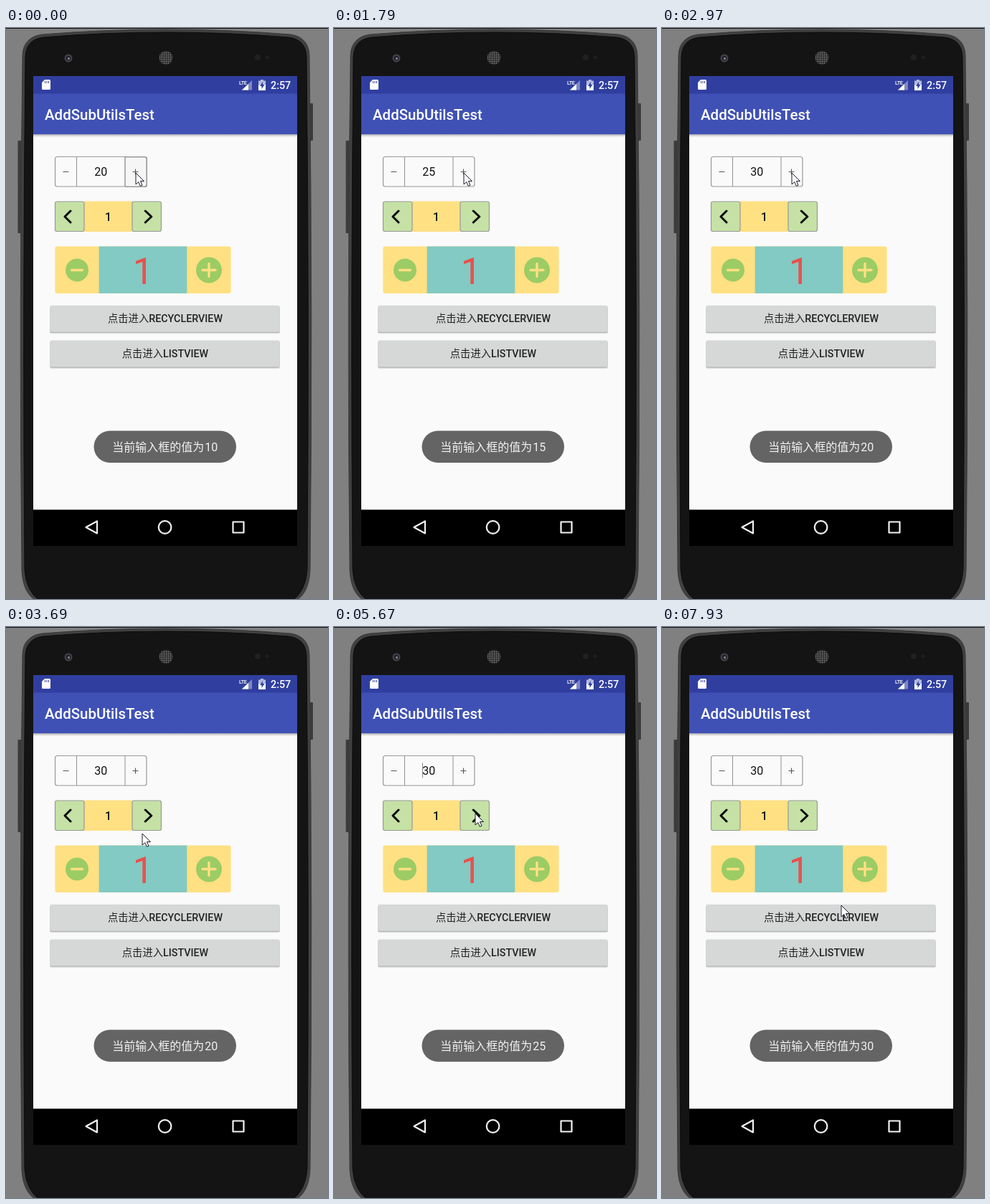
These frames come from a looping animation (449x796 px, 8000 ms). An HTML page:

```html
<!DOCTYPE html>
<html lang="zh">
<head>
<meta charset="utf-8">
<style>
html, body { margin: 0; width: 100%; height: 100%; overflow: hidden; background: #808080; }
svg { display: block; }
text { font-family: Roboto, "Noto Sans CJK SC", "Noto Sans CJK", sans-serif; }
.mid { text-anchor: middle; }
.med { font-weight: 500; }
.line { fill: none; stroke-linecap: round; stroke-linejoin: round; }
</style>
</head>
<body>
<svg width="449" height="796" viewBox="0 0 449 796">
  <defs>
    <pattern id="mesh" width="3" height="3" patternUnits="userSpaceOnUse">
      <rect width="3" height="3" fill="#292929"/><circle cx="1.5" cy="1.5" r="1" fill="#777"/>
    </pattern>
    <linearGradient id="shade" x2="0" y2="1">
      <stop stop-color="#000" stop-opacity=".28"/><stop offset="1" stop-color="#000" stop-opacity="0"/>
    </linearGradient>
  </defs>

  <!-- Phone -->
  <rect width="449" height="1" fill="#111"/>
  <rect x="16.5" y="157" width="6" height="129" rx="1" fill="#3b3b3b"/>
  <rect x="422" y="105" width="6" height="52" rx="1" fill="#3b3b3b"/>
  <path d="M23 38Q24 13 50 9Q135 2 223 2T397 9Q422 13 423 38Q428 400 424 757Q422 790 402 799H44Q24 790 22 757Q18 400 23 38Z" fill="#404040" stroke="#3a3a3a"/>
  <path d="M27 40Q28 16 52 13Q135 6 223 6T394 13Q418 16 419 40Q423 400 420 755Q418 786 398 799H48Q28 786 26 755Q23 400 27 40Z" fill="#141414" stroke="#0c0c0c"/>
  <circle cx="87" cy="42" r="5.5" fill="#44444b"/>
  <circle cx="87" cy="42" r="3.5" fill="#23232e"/>
  <circle cx="87.5" cy="42.5" r="1.5" fill="#8d8da2"/>
  <circle cx="223" cy="41.5" r="9.5" fill="url(#mesh)"/>
  <circle cx="351" cy="41" r="4" fill="#202020"/>
  <circle cx="364" cy="41" r="2.5" fill="#1f1f1f"/>

  <!-- Screen -->
  <rect x="38" y="67" width="368" height="655"/>
  <rect x="38" y="91" width="368" height="580.5" fill="#fafafa"/>
  <rect x="38" y="67" width="368" height="25" fill="#303f9f"/>
  <rect x="38" y="91.5" width="368" height="56.7" fill="#3f51b5"/>
  <rect x="38" y="148.2" width="368" height="4" fill="url(#shade)"/>
  <path d="M54 72H60.5Q62 72 62 73.5V84.5Q62 86 60.5 86H51.5Q50 86 50 84.5V76Z" fill="#fff"/>
  <path d="M54.5 74v3M57 74v3M59.5 74v3" stroke="#303f9f"/>
  <path d="M343 73V86.5H329Z" fill="#7f89c4"/>
  <path d="M338 78V86.5H329Z" fill="#fff"/>
  <text x="325" y="78.5" font-size="7.5" class="med" fill="#fff" letter-spacing="-.5">LTE</text>
  <path d="M355 72h4v1.5h3V87h-10V73.5h3Z" fill="#b5bbdd"/>
  <path d="M352 79h10v8h-10Z" fill="#fff"/>
  <path d="M358 75l-4 6h2.5v4l4-6H358Z" fill="#303f9f"/>
  <text x="369" y="84.5" font-size="14.3" class="med" fill="#fff">2:57</text>
  <text x="54" y="127.8" font-size="20.44" class="med" fill="#fff">AddSubUtilsTest</text>

  <!-- Outlined stepper -->
  <rect x="68.5" y="179.5" width="127.5" height="41.5" rx="3" fill="#fafafa" stroke="#999" stroke-width="1.2"/>
  <path d="M98.5 180V221M166 180V221" stroke="#999" stroke-width="1.1"/>
  <rect id="press" x="166" y="180" width="30.5" height="41.5" rx="1" stroke="#999"/>
  <path d="M79.5 200.5h8M176.5 200.5h8M180.5 196.5v8" stroke="#555" stroke-width="1.1"/>
  <text id="value" x="132.2" y="206" font-size="16" class="mid" fill="#111"></text>
  <path id="caret" d="M123.5 189.5V210.5" stroke="#888"/>

  <!-- Green stepper -->
  <rect x="109" y="241.5" width="67" height="42.5" fill="#ffe082"/>
  <g fill="#c5e1a5" stroke="#999" stroke-width="1.2">
    <rect x="68.5" y="242" width="40.5" height="41.5" rx="2.5"/>
    <rect x="176" y="242" width="40.5" height="41.5" rx="2.5"/>
  </g>
  <path d="M90 255L82 263L90 271M194.3 255L202.8 263L194.3 271" class="line" stroke="#0a0a0a" stroke-width="3"/>
  <text x="142.5" y="269" font-size="16" class="mid med" fill="#111">1</text>

  <!-- Large stepper -->
  <rect x="68.3" y="304.5" width="245.3" height="65.4" rx="3" fill="#ffe082"/>
  <rect x="129.6" y="304.5" width="122.7" height="65.4" fill="#82cac3"/>
  <circle cx="99" cy="337.5" r="16" fill="#9ccc65"/>
  <circle cx="283" cy="337.5" r="18" fill="#9ccc65"/>
  <path d="M91.5 337.5h15M274 337.5h18M283 328.5v18" class="line" stroke="#ffe082" stroke-width="3.3"/>
  <text x="191.2" y="357" font-size="51.1" class="mid" fill="#e9504e">1</text>

  <g id="buttons"></g>

  <!-- Toast -->
  <g id="toast">
    <rect x="122.5" y="561.5" width="198.5" height="44.5" rx="22.25" fill="#646464"/>
    <g font-size="16" fill="#f2f2f2">
      <text x="148.3" y="590">当前输入框的值为</text>
      <text id="old" x="277.3" y="590"></text>
      <text id="new" x="277.3" y="590"></text>
    </g>
  </g>

  <!-- Navigation -->
  <g class="line" stroke="#f2f2f2" stroke-width="2.2">
    <path d="M127 687.5V704.5L111.5 696Z"/>
    <circle cx="221.6" cy="696" r="8.8"/>
    <rect x="316.5" y="688.5" width="15" height="15"/>
  </g>

  <path id="pointer" d="M0 0V16L3.8 12.6L6.3 18.3L9 17.2L6.5 11.5H11.5Z" fill="#fff" stroke="#1c1c2c"/>
</svg>
<script>
const LOOP = 8000;
const PRESSES = [-250, 1090, 2220];
const TOAST = { start: 430, every: 1960, fade: 330 };
// Pointer moves: start, end, and the place reached.
const MOVES = [
  [3200, 3400, 196, 285], [3550, 3690, 190, 288], [4350, 4730, 212, 281],
  [5040, 5600, 197, 260], [7230, 7760, 258, 393], [7760, 7930, 250, 388],
];

const $ = id => document.getElementById(id);
const set = (id, name, value) => $(id).setAttribute(name, value);

function ease(t, start, end) {
  const p = Math.min(1, Math.max(0, (t - start) / (end - start)));
  return p * p * (3 - 2 * p);
}

$('buttons').innerHTML = ['RECYCLERVIEW', 'LISTVIEW'].map((name, i) => `
  <g transform="translate(0 ${386.7 + i * 48.7})">
    <rect x="61" y="1.5" width="321" height="38" rx="2" opacity=".1"/>
    <rect x="61.5" y="1" width="320" height="37.3" rx="2" opacity=".2"/>
    <rect x="61.5" width="320" height="37" rx="2" fill="#d6d7d7"/>
    <text x="222" y="23.4" font-size="14.31" class="mid med" fill="#222">点击进入${name}</text>
  </g>`).join('');

function drawStepper(t) {
  const since = t - PRESSES.findLast(start => start <= t);
  const added = PRESSES.filter(start => start + 140 <= t).length;
  const shade = 0.1 - 0.084 * ease(since, 150, 260);
  $('value').textContent = 15 + 5 * added;
  set('press', 'fill', `rgba(0, 0, 0, ${shade})`);
  set('press', 'visibility', since < 680 ? 'visible' : 'hidden');
  set('caret', 'opacity', (t + 820) % 1000 < 500 ? 1 : 0);
}

function drawToast(t) {
  const { start, every, fade } = TOAST;
  const index = Math.max(0, Math.floor((t - start) / every));
  const begin = start + index * every;
  const mix = ease(t, begin, begin + fade);
  $('old').textContent = 10 + index * 5;
  $('new').textContent = 15 + index * 5;
  set('old', 'opacity', 1 - mix);
  set('new', 'opacity', mix);
  // Only the second message fades the bubble along with its digits.
  set('toast', 'opacity', index === 1 ? 1 - mix * (1 - mix) : 1);
}

function drawPointer(t) {
  let x = 181, y = 202;
  for (const [start, end, toX, toY] of MOVES) {
    const p = ease(t, start, end);
    x += (toX - x) * p;
    y += (toY - y) * p;
  }
  set('pointer', 'transform', `translate(${Math.round(x)} ${Math.round(y)})`);
}

const begin = performance.now();
function frame() {
  const t = (performance.now() - begin) % LOOP;
  drawStepper(t);
  drawToast(t);
  drawPointer(t);
  requestAnimationFrame(frame);
}
frame();
</script>
</body>
</html>
```
